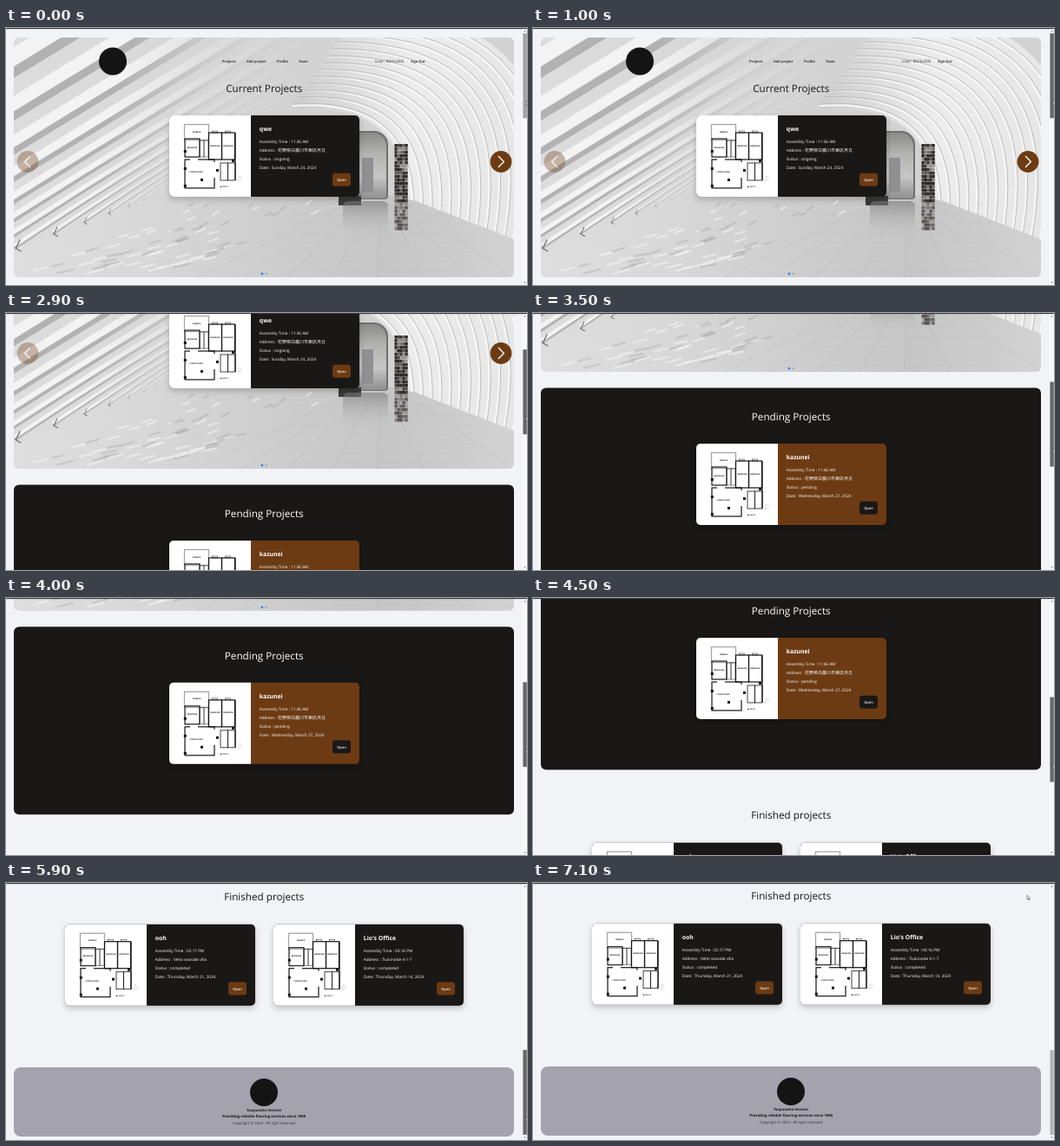
An HTML page with a canvas that plays this animation: 600x297 px, repeating every 7.2 s.

```html
<!DOCTYPE html>
<html lang="en">
<head>
<meta charset="utf-8">
<title>Interior projects</title>
<style>
  html, body { margin: 0; width: 100%; height: 100%; overflow: hidden; background: #f2f3f6; }
  canvas { display: block; width: 600px; height: 297px; }
</style>
</head>
<body>
<canvas id="stage"></canvas>
<script>
const W = 600, H = 297, LOOP = 7200, STEP = 100, MAX_SCROLL = 561;
const DARK = '#1a1816', BROWN = '#6d3b13', PAGE = '#f2f3f6', INK = '#151515';
const SANS = '"Open Sans", "Noto Sans", sans-serif';
const CJK = '"Noto Sans CJK JP", "Noto Sans CJK", sans-serif';

const canvas = document.getElementById('stage');
const ctx = canvas.getContext('2d');
const ratio = window.devicePixelRatio || 1;
canvas.width = W * ratio;
canvas.height = H * ratio;

// ---------- helpers ----------
const lerp = (a, b, u) => a + (b - a) * u;

function seeded(seed) {
  return () => (seed = (seed * 16807) % 2147483647) / 2147483647;
}

function text(str, x, y, size, color, weight = 400, align = 'left', family = SANS) {
  ctx.font = `${weight} ${size}px ${family}`;
  ctx.textAlign = align;
  ctx.fillStyle = color;
  ctx.fillText(str, x, y);
  return ctx.measureText(str).width;
}

function box(x, y, w, h, r, color) {
  ctx.fillStyle = color;
  ctx.beginPath();
  ctx.roundRect(x, y, w, h, r);
  ctx.fill();
}

function disc(x, y, r, color) {
  ctx.fillStyle = color;
  ctx.beginPath();
  ctx.arc(x, y, r, 0, Math.PI * 2);
  ctx.fill();
}

function poly(points, color) {
  ctx.fillStyle = color;
  ctx.beginPath();
  points.forEach(p => ctx.lineTo(...p));
  ctx.fill();
}

function line(points, color, width) {
  ctx.strokeStyle = color;
  ctx.lineWidth = width;
  ctx.beginPath();
  points.forEach(p => ctx.lineTo(...p));
  ctx.stroke();
}

function curve(from, bend, to, color, width) {
  ctx.strokeStyle = color;
  ctx.lineWidth = width;
  ctx.beginPath();
  ctx.moveTo(...from);
  ctx.quadraticCurveTo(...bend, ...to);
  ctx.stroke();
}

function fade(x0, y0, x1, y1, ...colors) {
  const g = ctx.createLinearGradient(x0, y0, x1, y1);
  colors.forEach((c, i) => g.addColorStop(i / (colors.length - 1), c));
  return g;
}

// ---------- motion ----------
// Drag of the scrollbar: time and scroll position at each change of pace.
const DRAG = [[1600, 0], [2100, 19], [2900, 108], [3500, 220], [4500, 325], [5400, 476.5], [5900, 560]];

const pace = i => (DRAG[i + 1][1] - DRAG[i][1]) / (DRAG[i + 1][0] - DRAG[i][0]);

function tangent(i) {
  if (i === 0) return 0;
  if (i === DRAG.length - 1) return pace(i - 1);
  const a = pace(i - 1), b = pace(i);
  return 2 * a * b / (a + b);
}

function scrollAt(t) {
  if (t >= 6200) return MAX_SCROLL;
  const i = DRAG.findIndex(k => k[0] > t) - 1;
  if (i < 0) return t < DRAG[0][0] ? 0 : MAX_SCROLL - 1;
  const [t0, y0] = DRAG[i], [t1, y1] = DRAG[i + 1];
  const d = t1 - t0, u = (t - t0) / d, v = 1 - u;
  return y0 * (1 + 2 * u) * v * v + tangent(i) * d * u * v * v
    + y1 * u * u * (3 - 2 * u) - tangent(i + 1) * d * u * u * v;
}

function cursorAt(t, scroll) {
  const grip = 84 + scroll / 3;
  if (t >= 7100) return [569, 14];
  const u = Math.min(Math.max((t - 6600) / 300, 0), 1);
  const eased = 1 - (1 - u) ** 2;
  return [lerp(599, 567, eased), lerp(grip, 18, eased)];
}

// ---------- hero ----------
function leftRibs() {
  for (let i = 7; i >= -8; i--) {
    const s = 0.8 ** i, x = 230 - 176 * s, y = 172 + 66 * s;
    const end = [340, y - 0.62 * (340 - x)];
    const bend = [(x + 340) / 2, (y + end[1]) / 2 - 8];
    curve([x, y], bend, end, '#b2b2b2', 2.6 * s);
    curve([x, y - 2.6 * s], [bend[0], bend[1] - 2.6 * s], [end[0], end[1] - 2.6 * s], '#f3f3f3', 3.2 * s);
    line([[x + 5 * s, y - 8 * s], [x + s, y], [x + 6 * s, y + 3 * s]], '#707070', 1.1 * s);
  }
  ctx.fillStyle = fade(130, 60, 330, 110, 'rgba(214,214,214,0)', 'rgba(214,214,214,.8)', '#d2d2d2');
  ctx.fillRect(9, 11, 576, 200);
}

function rightArches() {
  const tone = fade(340, 0, 585, 0, '#cfcfcf', '#ececec', '#e6e6e6');
  for (let i = 13; i >= 0; i--) {
    const from = [330 + 6 * i, 88 - 8 * i], bend = [466 + 15 * i, 78 - 7 * i], to = [470 + 10.5 * i, 200 + 4.2 * i];
    curve(from, bend, to, tone, 13);
    curve(from, bend, to, '#b9b9b9', 0.9);
    curve([from[0], from[1] + 2], [bend[0] - 2, bend[1] + 2], [to[0] - 2, to[1]], '#f7f7f7', 2);
  }
}

function floor() {
  poly([[9, 262], [200, 184], [385, 180], [472, 200], [585, 244], [585, 288], [9, 288]],
    fade(9, 0, 585, 0, '#dedede', '#d8d8d8', '#cecece', '#c6c6c6', '#d2d2d2'));
  const rnd = seeded(7);
  for (let i = 0; i < 70; i++) {
    const depth = rnd(), x = lerp(225, 20, depth) + 170 * rnd(), y = lerp(200, 284, depth);
    line([[x, y], [x + 6 + 14 * depth, y - 3 - 3 * rnd()]], rnd() < 0.5 ? 'rgba(130,130,130,.22)' : 'rgba(250,250,250,.5)', 2.2);
  }
  for (let i = 0; i < 8; i++) {
    line([[400 + 8 * i, 200], [220 + 52 * i, 288]], 'rgba(130,130,130,.2)', 0.6);
    line([[330, 204 + 11 * i], [540, 204 + 11 * i]], 'rgba(130,130,130,.15)', 0.5);
  }
}

function farEnd() {
  box(400, 119, 40, 79, [0, 16, 4, 0], '#6f6f6f');
  box(400, 121, 38, 76, [0, 15, 3, 0], fade(0, 121, 0, 197, '#8c8c8a', '#b4b4b2', '#c6c6c6', '#8f8f8f'));
  box(410, 150, 13, 40, 0, '#8e9092');
  box(383, 194, 26, 11, 0, '#3a3a3a');
  box(388, 200, 52, 45, 6, fade(0, 200, 0, 245, 'rgba(120,120,120,.6)', 'rgba(200,200,200,0)'));
  const rnd = seeded(19);
  for (let y = 134; y < 234; y += 4) {
    const mirrored = y > 205;
    for (let x = 447.5; x < 462; x += 3) {
      const v = Math.round(30 + 130 * rnd() ** 2);
      ctx.fillStyle = `rgba(${v + 8},${v + 2},${v},${mirrored ? 0.7 : 1})`;
      ctx.fillRect(x, y, 3.2, 3.6);
    }
  }
}

function arrow(x, dir, alpha) {
  ctx.globalAlpha = alpha;
  disc(x, 154.5, 12.4, BROWN);
  ctx.globalAlpha = alpha < 1 ? 0.85 : 1;
  line([[x - 3 * dir, 148], [x + 3.4 * dir, 154.5], [x - 3 * dir, 161]], '#fff', 1.3);
  ctx.globalAlpha = 1;
}

function heading(label, y, color = INK) {
  text(label, 297.2, y, 11.68, color, 400, 'center');
}

function hero() {
  ctx.save();
  ctx.beginPath();
  ctx.roundRect(9, 11, 576, 277, 6);
  ctx.clip();
  ctx.fillStyle = fade(9, 0, 585, 0, '#dcdcdc', '#d8d8d8', '#cacaca', '#e2e2e2');
  ctx.fillRect(9, 11, 576, 277);
  leftRibs();
  rightArches();
  floor();
  farEnd();
  ctx.restore();

  disc(123, 38.5, 16, '#141414');
  let x = 249;
  for (const label of ['Projects', 'Add project', 'Profile', 'Team']) {
    x += text(label, x, 39.6, 4.08, '#1c1c1c', 600) + 12.3;
  }
  text('User: Mirituli05', 425, 39.8, 4.67, '#333');
  text('Sign Out', 466, 39.6, 4.08, '#1c1c1c', 600);
  heading('Current Projects', 73.6);
  arrow(25, -1, 0.35);
  arrow(570, 1, 1);
  disc(295, 284, 1.3, '#1a7bea');
  disc(299.8, 284, 1.2, '#8fa9c6');
}

// ---------- cards ----------
function room(x, y, w, h, name, width = 1.2, color = INK) {
  ctx.strokeStyle = color;
  ctx.lineWidth = width;
  ctx.strokeRect(x, y, w, h);
  if (name) text(name, x + w / 2, y + h / 2, 2.2, INK, 700, 'center');
}

function plan(x, y) {
  ctx.save();
  ctx.translate(x, y);
  room(17.5, 10.5, 28, 18, 'TERRACE', 1.3, '#a5a5a5');
  room(18, 27, 17, 21, 'BEDROOM');
  for (let i = 0; i < 2; i++) {
    const left = 45.5 + 15 * i;
    room(left, 20, 15, 31, 'BEDROOM');
    room(left + 4, 18, 6, 2, '', 0.5);
    room(59 + 8.5 * i, 55, 8.5, 20, '', 0.8);
    room(35 + 5 * i, 29, 5, 19, '', 0.5);
  }
  room(18, 51, 34, 33, '', 1.2);
  text('LIVING ROOM', 31, 66, 2.2, INK, 700, 'center');
  line([[76, 20], [76, 75]], INK, 1.3);

  // door gaps, columns
  ctx.fillStyle = '#fff';
  ctx.fillRect(24, 49, 9, 4);
  ctx.fillRect(50, 54, 4, 18);
  ctx.fillStyle = INK;
  for (let i = 0; i < 3; i++) {
    ctx.fillRect(16.8, 40 + 20 * i, 3, 3);
    ctx.fillRect(36 + 18 * i, 73 - 11 * i, 3, 3);
  }
  disc(59.5, 82.5, 0.8, INK);
  text('ENTRY', 61.5, 83.3, 2, '#333', 700);
  line([[79, 76], [81, 69.5], [83.5, 73], [79, 76]], '#bbb', 0.5);
  ctx.restore();
}

function card({ x, y, finished, pending, title, time, place, status, date }) {
  ctx.save();
  ctx.shadowColor = 'rgba(0,0,0,.22)';
  ctx.shadowBlur = 7 * ratio;
  ctx.shadowOffsetY = 3 * ratio;
  box(x, y, 219, 94, 5, pending ? BROWN : DARK);
  ctx.restore();
  box(x, y, 94, 94, [5, 0, 0, 5], '#fff');
  plan(x, y);

  const left = x + 103.8;
  text(title, left, y + 18.2, 6.85, '#fff', 700);
  const rows = ['Assembly Time : ' + time, 'Address : ', 'Status : ' + status, 'Date : ' + date];
  const widths = rows.map((row, i) => text(row, left, y + 32.1 + 10 * i, 4.67, '#fff', 500));
  text(place, left + widths[1], y + 42.1, finished ? 4.67 : 5, '#fff', 500, 'left', finished ? SANS : CJK);

  box(x + 188, y + 66.7, 21, 15, 3, pending ? DARK : BROWN);
  text('Open', x + 198.5, y + 75.8, 4.1, '#f0ece8', 600, 'center');
}

const place = '花野県白露川市東区月丘';
const finished = { y: 607.7, finished: true, status: 'completed' };
const CARDS = [
  { x: 188, y: 101, title: 'qwe', time: '11:36 AM', place, status: 'ongoing', date: 'Sunday, March 24, 2024' },
  { x: 188, y: 371, pending: true, title: 'kazunei', time: '11:46 AM', place, status: 'pending', date: 'Wednesday, March 27, 2024' },
  { ...finished, x: 68, title: 'ooh', time: '02:17 PM', place: 'Velto seaside villa', date: 'Thursday, March 21, 2024' },
  { ...finished, x: 308, title: "Lio's Office", time: '04:16 PM', place: 'Tsukinobe 4-1-7', date: 'Thursday, March 14, 2024' }
];

function footer() {
  box(9, 773, 576, 80, 8, '#a4a2ad');
  disc(297, 802, 16, '#141414');
  text('Tsuyunoha Interior', 297.2, 824.1, 4.25, INK, 700, 'center');
  text('Providing reliable flooring services since 1980', 297.2, 830.6, 4.25, INK, 700, 'center');
  text('Copyright © 2024 - All right reserved', 297.2, 839.2, 4.25, '#2e2e33', 400, 'center');
}

// ---------- window frame ----------
function thumbColor(t) {
  if (t >= 6700) return '#b4b4b4';
  return t >= 1000 && t < 6500 ? '#686868' : '#a2a2a2';
}

function scrollbar(t, scroll) {
  ctx.fillStyle = '#f8f8f8';
  ctx.fillRect(595, 0, 5, H);
  ctx.fillStyle = thumbColor(t);
  ctx.fillRect(595.4, 6.2 + scroll / 3, 4.4, 98);
  for (const [y, dir] of [[3, 1], [295, -1]]) {
    poly([[596.4, y + 1.6 * dir], [597.6, y], [598.8, y + 1.6 * dir]], '#666');
  }
}

function pointer(x, y) {
  const shape = [[x, y], [x, y + 5.2], [x + 1.3, y + 4.1], [x + 2.4, y + 6], [x + 2.3, y + 3.8], [x + 3.7, y + 3.7]];
  poly(shape, '#fff');
  line([...shape, shape[0]], '#222', 0.5);
}

function draw(t) {
  const scroll = scrollAt(t);
  ctx.setTransform(ratio, 0, 0, ratio, 0, 0);
  ctx.textRendering = 'geometricPrecision';
  ctx.fillStyle = PAGE;
  ctx.fillRect(0, 0, W, H);
  ctx.save();
  ctx.translate(0, -scroll);
  hero();
  box(9, 306.5, 576, 217, 6, DARK);
  heading('Pending Projects', 343.8, '#fff');
  heading('Finished projects', 580.2);
  CARDS.forEach(card);
  footer();
  ctx.restore();
  scrollbar(t, scroll);
  ctx.fillStyle = '#3c3c40';
  ctx.fillRect(0, 0, W, 1.1);
  pointer(...cursorAt(t, scroll));
}

const start = performance.now();
let last = -1;
function tick() {
  const t = Math.floor((performance.now() - start) % LOOP / STEP) * STEP;
  if (t !== last) draw(last = t);
  requestAnimationFrame(tick);
}
tick();
</script>
</body>
</html>
```
